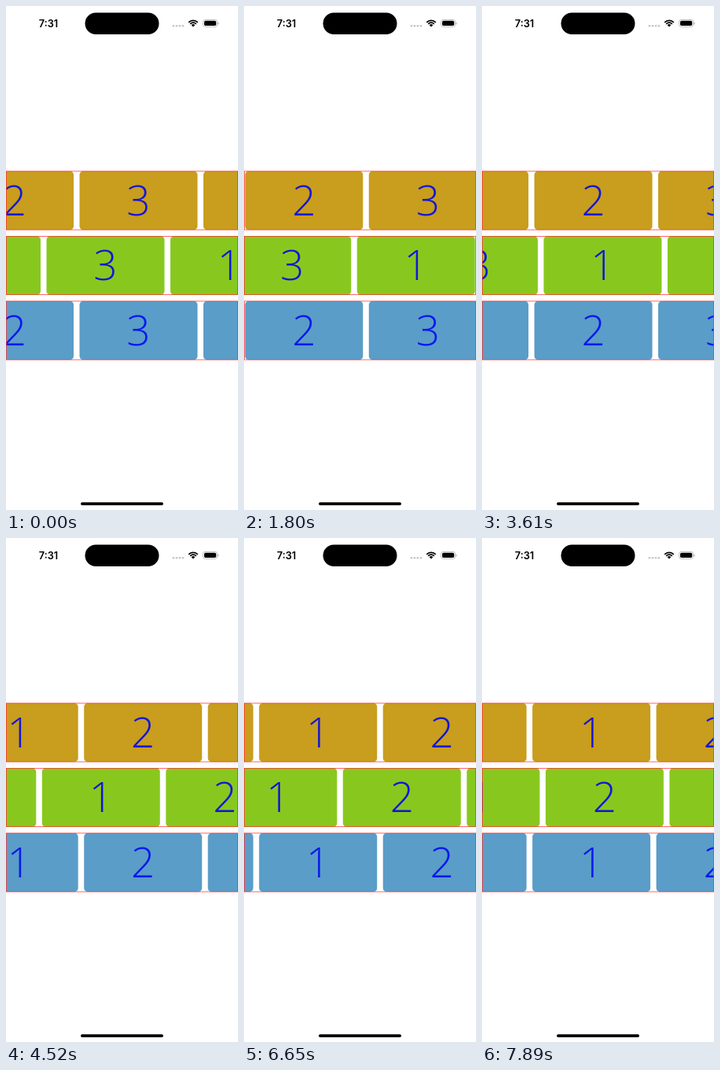
Recreate the animation shown at these times as an HTML page with a canvas. Size 295 by 640 pixels, loop 8000 ms.

```html
<!DOCTYPE html>
<html lang="en">
<head>
<meta charset="utf-8">
<title>Card marquee</title>
<style>
  html, body { margin: 0; width: 100%; height: 100%; overflow: hidden; background: #fff; }
  canvas { display: block; width: 295px; height: 640px; }
</style>
</head>
<body>
<canvas id="stage"></canvas>
<script>
const W = 295, H = 640;
const LOOP = 8000, STEPS = 71, STEP_PX = 4.08;
const CARD_W = 150, CARD_H = 75, PITCH = 157.5, RADIUS = 5;

// x: left edge of the card labelled order[0] at time zero
const rows = [
  { y: 209.5, x: 93.5, dir: 1, order: '321', fill: '#c99d1d', ink: '#1518d2' },
  { y: 292, x: 51.5, dir: -1, order: '312', fill: '#88c81e', ink: '#1018d8' },
  { y: 374.5, x: 93.5, dir: 1, order: '321', fill: '#5a9dc8', ink: '#0a18ee' }
];
// The sequence runs leftwards in rows that move right
const canvas = document.getElementById('stage');
const ctx = canvas.getContext('2d');
const dpr = window.devicePixelRatio || 1;
canvas.width = W * dpr;
canvas.height = H * dpr;

function box(x, y, w, h, r, color) {
  ctx.fillStyle = color;
  ctx.beginPath();
  ctx.roundRect(x, y, w, h, r);
  ctx.fill();
}

function label(text, x, y, font, color) {
  ctx.font = font;
  ctx.fillStyle = color;
  ctx.textAlign = 'center';
  ctx.fillText(text, x, y);
}

function drawWifi(cx, cy) {
  const a = Math.PI * 0.25;
  ctx.strokeStyle = ctx.fillStyle = '#000';
  ctx.lineWidth = 1.7;
  for (const r of [8.2, 5.4]) {
    ctx.beginPath();
    ctx.arc(cx, cy, r, -Math.PI + a, -a);
    ctx.stroke();
  }
  ctx.beginPath();
  ctx.moveTo(cx, cy);
  ctx.arc(cx, cy, 3.3, -Math.PI + a, -a);
  ctx.fill();
}

function drawBattery(x, y) {
  ctx.strokeStyle = '#a6a6a6';
  ctx.lineWidth = 0.75;
  ctx.beginPath();
  ctx.roundRect(x, y, 18, 9, 2.8);
  ctx.stroke();
  box(x + 1.4, y + 1.4, 15.2, 6.2, 1.7, '#000');
  box(x + 18.9, y + 3, 1, 3, 0.5, '#a6a6a6');
}

function drawChrome() {
  label('7:31', 54, 26.5, '600 12.75px Inter, sans-serif', '#000');
  box(100.5, 8.5, 94, 27.5, 13.75, '#000');
  for (let i = 0; i < 4; i++) box(211.6 + i * 4, 23.9, 2.7, 2.7, 1.35, '#c4c4c4');
  drawWifi(238, 26.6);
  drawBattery(250.6, 17.4);
  box(95, 630.2, 105, 3.8, 1.9, '#000');
}

function drawRow(row, shift) {
  const x0 = row.x + row.dir * shift;
  const first = Math.floor(-x0 / PITCH) - 1;
  ctx.save();
  ctx.beginPath();
  ctx.rect(0, row.y, W, CARD_H);
  ctx.clip();
  for (let i = first; i < first + 5; i++) {
    const x = x0 + i * PITCH;
    const k = ((-row.dir * i) % 3 + 3) % 3;
    box(x, row.y, CARD_W, CARD_H, RADIUS, row.fill);
    label(row.order[k], x + CARD_W / 2, row.y + 56,
      '300 53px "Open Sans", "Noto Sans", sans-serif', row.ink);
  }
  ctx.restore();
  ctx.strokeStyle = '#ff3030';
  ctx.lineWidth = 0.75;
  ctx.strokeRect(0.375, row.y + 0.375, W - 0.75, CARD_H - 0.75);
}

function draw(t) {
  // the motion advances in even ticks
  const tick = Math.min(STEPS - 1, Math.floor((t + 25) * STEPS / LOOP));
  ctx.setTransform(dpr, 0, 0, dpr, 0, 0);
  ctx.fillStyle = '#fff';
  ctx.fillRect(0, 0, W, H);
  drawChrome();
  for (const row of rows) drawRow(row, tick * STEP_PX);
}

const start = performance.now();
function frame() {
  draw((performance.now() - start) % LOOP);
  requestAnimationFrame(frame);
}
frame();
</script>
</body>
</html>
```
